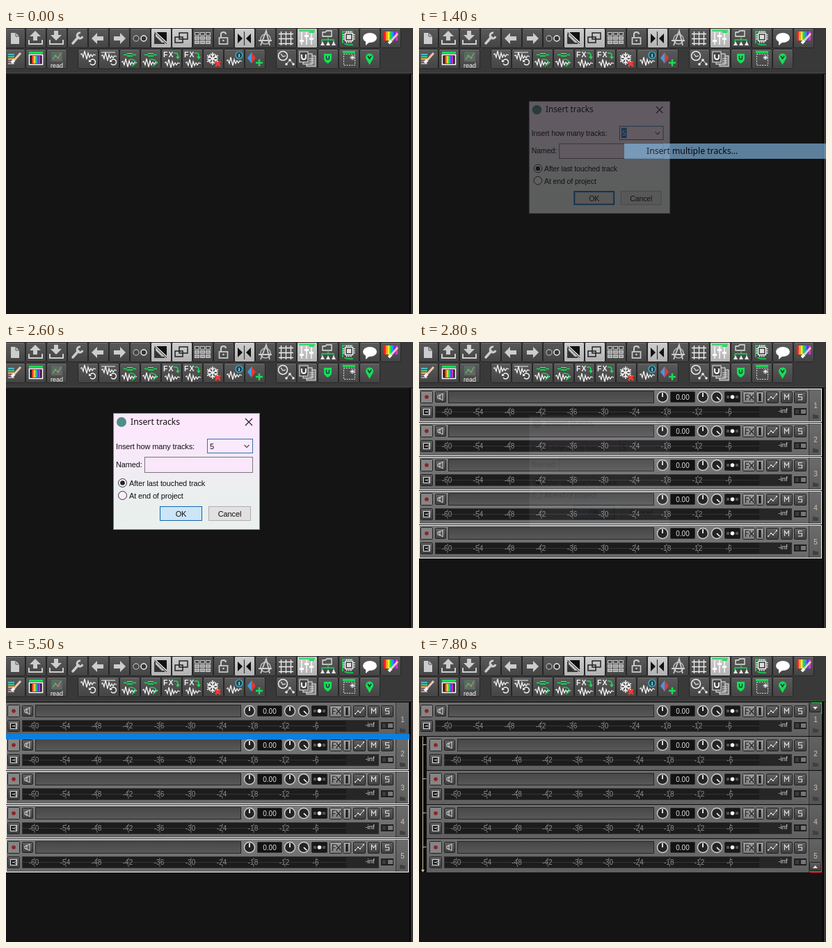
Write an HTML page that moves like this. It is 585x411 px and loops after 8 s.

```html
<!DOCTYPE html>
<html lang="en">
<head>
<meta charset="utf-8">
<title>Insert tracks</title>
<style>
html,body{margin:0;width:100%;height:100%;overflow:hidden;background:#141414}
svg{display:block;width:585px;height:411px}
text{font-family:"Liberation Sans",Arial,sans-serif;white-space:pre}
.ui{font-family:"Noto Sans","Open Sans",sans-serif;font-size:12.2px}
.dlg{font-size:11px;letter-spacing:-.14px}
</style>
</head>
<body>
<svg id="stage" viewBox="0 0 585 411" xmlns="http://www.w3.org/2000/svg"></svg>
<script>
(() => {
const R = (x, y, w, h, fill, more = '') => `<rect x="${x}" y="${y}" width="${w}" height="${h}" fill="${fill}" ${more}/>`;
const C = (x, y, r, fill, more = '') => `<circle cx="${x}" cy="${y}" r="${r}" fill="${fill}" ${more}/>`;
const L = (d, color, w = 1, more = '') => `<path d="${d}" fill="none" stroke="${color}" stroke-width="${w}" ${more}/>`;
const F = (d, fill) => `<path d="${d}" fill="${fill}"/>`;
const T = (x, y, size, fill, s, more = '') => `<text x="${x}" y="${y}" font-size="${size}" fill="${fill}" ${more}>${s}</text>`;
const G = (s, more = '') => `<g ${more}>${s}</g>`;
const mid = 'text-anchor="middle"';
const line = (c, w = 1) => `stroke="${c}" stroke-width="${w}"`;
const grad = (id, ...stops) => `<linearGradient id="${id}" x2="0" y2="1">${stops.map((c, i) =>
  `<stop offset="${i / (stops.length - 1)}" stop-color="${c}"/>`).join('')}</linearGradient>`;
const clamp = v => Math.max(0, Math.min(1, v));

const ink = '#cdcdcd', green = '#17dd55', white = '#f2f2f2';
const defs = '<defs>' + grad('btn', '#5a5a5a', '#444') + grad('lit', '#cfcfcf', '#b2b2b2') +
  grad('row', '#6f6f6f', '#606060') + grad('rowSel', '#7a7a7a', '#686868') + grad('name', '#474747', '#585858') +
  grad('key', '#626262', '#3e3e3e') + grad('fx', '#a0a0a0', '#7b7b7b') +
  grad('pane', '#ffe8ff', '#f8e8fa', '#ebefef', '#eaf0ee') + '</defs>';

// toolbar
const rainbow = (x, y, w, h) => ['#e22', '#f92', '#fe3', '#2d4', '#29f', '#63e', '#d3c']
  .map((c, i) => R(x + i * w / 7, y, w / 7 + .2, h, c)).join('');
const brush = (x, y) => L(`M${x} ${y}l-9 10`, '#e9c9b0', 3) + L(`M${x - 9} ${y + 10}l-4 4`, '#f4f4f4', 4);
const wave = (x, y) => L(`M${x} ${y}l2-1 2 5 2-9 3 12 2-9 2 6 2-4 2 3 2-3 3 1`, white, 1.3);
const loop = (x, y) => R(x - 5, y - 5, 10, 10, '#444') + L(`M${x - 3} ${y - 2}a4 4 0 1 1 0 4`, white, 1.5) + F(`M${x - 5} ${y - 4}v4h4z`, white);
const turn = (x, y) => L(`M${x} ${y}h3q3 0 3 4v3`, green, 1.6) + F(`M${x + 3} ${y + 5}h6l-3 4z`, green);
const rack = x => R(x + 11, 36, 8, 5, green) + L(`M${x + 6} 38.5h5M${x + 19} 38.5h5`, green, 1.3) +
  L(`M${x + 11} 38.5h8`, '#222') + wave(x + 3, 49) + L(`M${x + 15} 45q9 0 8 6l-5 4`, green, 1.4);
const fxWave = x => T(x + 3, 42, 10.5, white, 'FX', 'font-weight="bold" letter-spacing="1"') + turn(x + 18, 36) + wave(x + 5, 50);
const sliders = [[425, 17], [432, 10], [439, 14]].map(([x, y]) =>
  L(`M${x} 6V24`, '#fff', 1.4) + R(x - 3, y, 6, 3, '#fff')).join('');

const upper = [
  F('M7 7h7l5 5v11H7z', ink) + L('M14 7v5h5', '#555'),
  F('M42 4l8 8h-5v6h-6v-6h-5z', ink) + L('M33 17v6h19v-6', ink, 2),
  F('M72 18l8-8h-5V4h-6v6h-5z', ink) + L('M63 17v6h19v-6', ink, 2),
  L('M96 22l8-9', ink, 3.5, 'stroke-linecap="round"') + L('M107 7a4 4 0 1 0 3 5', ink, 3),
  F('M123 15l8-8v5h9v6h-9v5z', ink),
  F('M172 15l-8-8v5h-9v6h9v5z', ink),
  C(187, 15, 4, '#444', line('#aaa', 1.3)) + C(198, 15, 4, '#333', line('#eee', 1.5)),
  F('M213 6h18v17z', '#111') + L('M214 8v14h14', '#111', 1.5) + L('M215 6l16 15', '#eee', 1.5) + F('M215 12l9 9h-9z', '#333'),
  R(243, 13, 11, 8, 'none', line('#222', 1.5)) + R(249, 7, 12, 9, 'none', line('#222', 1.5)),
  [0, 1, 2].map(r => [0, 1, 2].map(c => R(271.5 + c * 8, 6.5 + r * 6, 6, 4, r ? '#999' : '#444', line('#ccc'))).join('')).join(''),
  R(306.5, 14, 12, 9, 'none', line(ink, 1.7)) + L('M309 14V9q0-3 3.5-3t3.5 3', ink, 2) + C(312.5, 18, 1.3, ink),
  F('M333 8l7 7-7 7zM352 8l-7 7 7 7z', '#111') + L('M342.5 5v20', '#333', 1.2),
  C(373, 16, 7, 'none', line('#bbb', 1.6)) + L('M366 25l8-21 5 21M363 18h19', '#ccc', 1.8),
  L('M395.5 5v20M402.5 5v20M409.5 5v20M392 8.5h21M392 15.5h21M392 22.5h21', '#eee', 1.3),
  R(421, 2, 23, 3, green, 'opacity=".7"') + sliders + L('M436 6h7', green, 2),
  L('M455 12V6h4l2-2h7v8z', '#e8e8e8', 1.3) + L('M463 12v5M454 21v-4h17v4', green, 1.3) +
    [452, 460, 468].map(x => F(`M${x} 25l3-6 3 6z`, '#e8e8e8')).join(''),
  L('M484 22V5h15', green, 1.6) + L('M487 22q1 3 12 2', green, 1.6) + R(487.5, 7.5, 11, 11, '#555', line('#fff', 1.3)) +
    R(490, 10, 6, 6, '#ddd') + L('M489 5.5h9M489 20.5h9M485.5 9v9M500.5 9v9', '#fff', 2, 'stroke-dasharray="1.5 1.5"'),
  '<ellipse cx="523" cy="14" rx="10" ry="7" fill="#fff"/>' + F('M517 18v7l6-5z', '#fff'),
  rainbow(543, 5, 20, 13) + brush(563, 8)
];
const lower = [
  [-2, ['#4bc', '#5c8', '#fb5', '#e66', '#aaa'].map((c, i) => R(3, 37 + i * 3.3, 9, 2, c)).join('') + brush(21, 36)],
  [28, R(33, 34, 20, 3, green) + R(33.5, 38.5, 19, 14, '#222', line('#fff', 1.5)) + rainbow(37, 40, 12, 11)],
  [58, R(65, 34, 16, 14, '#5d6a62') + L('M67 45l4-5 4 3 4-7', '#8db79c') + C(71, 40, 1.5, green) + C(75, 43, 1.5, '#e66') + T(73, 57, 9, '#fff', 'read', mid)],
  [103, wave(107, 38) + loop(124, 49)],
  [133, L('M137 35h20', white) + wave(137, 40) + loop(154, 49)],
  [163, rack(163)], [193, rack(193)], [223, fxWave(223)], [253, fxWave(253)],
  [283, [30, 90, 150].map(a => G(L('M288 44h18M290 41l3 3-3 3M304 41l-3 3 3 3', white, 1.5), `transform="rotate(${a} 297 44)"`)).join('') +
    L('M301 48l7 7M308 48l-7 7', '#f23b35', 3)],
  [313, wave(317, 47) + C(335, 39, 5, '#164b5c', line('#49b6cf', 1.2)) + T(335, 42, 8, '#fff', 'i', mid + ' font-weight="bold"')],
  [343, F('M353 35v16l-6-8z', '#3e9be0') + F('M353 35v16l6-8z', '#e03a36') + L('M359 50h10M364 45v10', green, 2.5)],
  [388, C(398, 40, 6.5, 'none', line('#eee', 1.5)) + L('M395 37l3 4 4-1', '#eee', 1.2) + L('M403 52l5-6 5 6', '#eee') +
    [[403, 52], [408, 46], [413, 52]].map(p => C(...p, 1.8, '#eee')).join('')],
  [418, R(432, 40, 13, 15, '#777', line('#eee')) + R(427, 37, 13, 15, '#666', line('#eee')) + R(422, 34, 12, 15, '#444', line('#eee')) +
    L('M425 38v4q0 3 3 3t3-3v-4', '#fff', 1.8) + L('M436 44h7M436 47h7M436 50h7', '#ddd')],
  [448, F('M457 37h11v7q0 4-5.5 7-5.5-3-5.5-7z', green) + L('M460.5 40v3q0 2 2 2t2-2v-3', '#134', 1.3)],
  [478, R(484, 33, 18, 3, green) + R(485.5, 37.5, 16, 16, 'none', 'stroke="#ddd" stroke-dasharray="2 1.5"') +
    L('M498 39v7M494.5 42.5h7M495.5 40l5 5M500.5 40l-5 5', '#fff')],
  [508, C(522.5, 42, 5.5, green) + F('M518 45h9l-4.5 8z', green) + L('M520 40l2.5 4 2.5-4', '#134', 1.5)]
];
const button = (x, y, fill) => R(x + .5, y + .5, 29, 28, fill, 'rx="2" stroke="#262626"') + L(`M${x + 2} ${y + 1.5}h26`, '#fff', 1, 'opacity=".16"');
const lit = [7, 8, 11, 14];
const toolbar = R(0, 0, 585, 65, '#393939') + R(0, 64, 585, 1, '#4a4a4a') + R(0, 65, 581, 2, '#202020') +
  upper.map((s, i) => button(-2 + 30 * i, 0, lit.includes(i) ? 'url(#lit)' : 'url(#btn)') + s).join('') +
  lower.map(([x, s]) => button(x, 30, 'url(#btn)') + s).join('') +
  R(580, 66, 2, 345, '#060606') + R(582, 66, 3, 345, '#373737');

// one track panel, drawn for the first row and shifted down
const key = (x, y, w, h, fill = 'url(#key)') => R(x + .5, y + .5, w - 1, h - 1, fill, 'rx="1" stroke="#202020"');
const knob = (x, a) => C(x, 79, 7.5, '#242424', line('#d0d0d0', 1.4)) +
  L(`M${x} 79v-6`, '#fff', 1.7, `transform="rotate(${a} ${x} 79)"`);
function panel(i, inset) {
  const x = inset ? 13 : 0, edge = inset ? 11 : 0, m = 23 + x;
  const step = inset ? 43.75 : 45;
  let s = R(edge, 67, 579 - edge, 48, 'url(#row)', 'class="body"') + R(560, 67, 1, 48, '#383838') + R(561, 67, 18, 48, '#000', 'opacity=".12"');
  s += key(x + 2, 70, 18, 18, '#858585') + C(x + 11, 79, 2.8, '#8a2328') + key(x + 23, 71, 16, 16) +
    L(`M${x + 27} 77h3l4-3v10l-4-3h-3z`, '#ddd') + L(`M${x + 30} 75v8`, '#ddd');
  s += R(x + 42.5, 70.5, 295 - x, 17, 'url(#name)', line('#252525'));
  s += knob(350, 0) + R(361.5, 71.5, 35, 15, '#121212', 'rx="1" stroke="#333"') + T(379, 82.5, 10, '#dedede', '0.00', mid) + knob(408, 0) + knob(428, 135);
  s += R(439.5, 71.5, 22, 15, '#181818', 'rx="1" stroke="#2a2a2a"') + R(442, 77, 4, 4, '#555') + R(455, 77, 4, 4, '#555') + C(450.5, 79, 2.8, '#fff');
  s += key(465, 71, 18, 17, 'url(#fx)') + L('M469.5 84v-9h4.5M469.5 79.5h4M475.5 75v2l5 5v2M480.5 75v2l-5 5v2', '#252525', 1.2);
  s += key(484, 71, 12, 17, 'url(#fx)') + R(488.5, 74, 3, 11, '#151515');
  s += key(499, 71, 18, 17) + L('M502 83l4-4 3 2 5-6', '#ddd') + [[502, 83], [506, 79], [509, 81], [514, 75]].map(p => C(...p, 1.1, '#eee')).join('');
  s += key(520, 71, 17, 17) + L('M525.5 83v-7.5l3 4 3-4v7.5', '#e4e4e4', 1.1);
  s += key(539, 71, 18, 17) + L('M551 75.5h-5.5v3.5h5v4h-5.5', '#e4e4e4', 1.1);
  s += key(x + 2, 92, 18, 17) + R(x + 6.5, 96.5, 9, 8, '#222', line('#ddd')) + L(`M${x + 9} 100.5h3l3-3v6l-3-3`, '#ddd');
  s += R(m + .5, 92.5, 512 - x, 16, '#1c1c1c', line('#303030')) + R(m + 1, 100, 511 - x, 1, '#343434') + R(489, 93, 46, 15, '#262626');
  for (let k = 0; k < 10; k++) {
    const tx = m + 18 + k * step;
    s += L(`M${tx} 94v3M${tx} 104v3`, '#777') + T(tx - 1, 103.5, 10, '#8d8d8d', k * 6 - 60, mid);
  }
  s += T(523, 102, 9.5, '#ddd', '-inf', mid) + R(539.5, 95.5, 17, 9, '#222', line('#1b1b1b')) + R(549, 97, 7, 6, '#777') + R(541, 97, 5, 6, '#3b3b3b');
  s += T(570, 94.5, 10, '#cfc69e', i + 1, mid) + F('M566 104h3l1 1h4v5h-8z', '#404040');
  s += R(edge + .5, 67.5, 578 - edge, 47, 'none', 'class="sel" stroke="#fff"');
  return G(s, `class="track" transform="translate(0 ${49 * i})"`);
}
const rows = [0, 1, 2, 3, 4];
const list = inset => R(0, 67, 580, 244, '#0c0c0c') + rows.map(i => panel(i, inset && i > 0)).join('');
const fold = (y, d) => key(561, y, 17, 13) + F(d, '#e8e8e8');
const tree = L('M5.5 116V310M5.5 127.5h5M5.5 176.5h5M5.5 225.5h5M5.5 274.5h5', '#c8c09c') + F('M3 307h5l-2.5 4z', '#c8c09c') +
  fold(68, 'M566 73h7l-3.5 4z') + L('M564 67.5h14.5V83', '#22d84a', 1.3) +
  fold(296, 'M566 305h7l-3.5-4z') + L('M562 310.5h16.5V296', '#f0352d', 1.3);

// popup menu and dialog
const entries = ['Insert new track', 'Insert multiple tracks...', 'Insert virtual instrument on new track...', 'Insert track from template', 'Show master track'];
const label = (i, color) => T(327, 181 + 22 * (i - 1), 12.2, color, entries[i], 'class="ui"');
const menu = R(292.5, 141.5, 300, 116, '#f0f0f0', line('#a9a9a9')) +
  R(295, 144, 290, 22, '#91c9f7', 'id="hover"') + entries.map((e, i) => label(i, '#111')).join('');
const chosen = R(295, 166, 290, 22, '#86bdea') + label(1, '#000');
const D = (x, y, s, more = '') => T(x, y, 11, '#111', s, 'class="dlg" ' + more);
const radio = (y, on) => C(167.5, y, 6, '#fbeefc', 'stroke="#333"') + (on ? C(167.5, y, 3.3, '#222') : '');
const dialog = R(154.5, 102.5, 210, 167, 'url(#pane)', line('#6c8291')) + R(155, 103, 209, 24, '#fde7fd') +
  C(166, 115, 7, '#4b8f86') + T(179, 119, 12.2, '#111', 'Insert tracks', 'class="ui"') + L('M344 110l10 10M354 110l-10 10', '#222', 1.2) +
  D(158, 154, 'Insert how many tracks:') + R(289.5, 139.5, 65, 20, '#fbeafc', line('#2e74b5')) +
  R(292, 142, 8, 15, '#1c74cc', 'id="mark"') + T(293, 153.5, 11, '#111', '5', 'id="count"') + L('M342.5 148l3.5 3.5 3.5-3.5', '#444', 1.1) +
  D(158, 180, 'Named:') + R(199.5, 165.5, 155, 22, '#fbe7fc', line('#777')) +
  radio(202.5, true) + D(177, 207, 'After last touched track') + radio(220.5) + D(177, 225, 'At end of project') +
  R(222, 237, 59, 19, '#e1e1e1', line('#0a6cbd', 2)) +
  R(221.5, 236.5, 60, 20, '#cce5f8', 'id="warm" stroke="#1264a8"') + D(251.5, 251, 'OK', mid) +
  R(291.5, 236.5, 60, 20, '#e2e0e2', line('#adadad')) + D(321.5, 251, 'Cancel', mid);

const $ = id => document.getElementById(id);
$('stage').innerHTML = defs + R(0, 0, 585, 411, '#141414') + toolbar +
  G(list(false), 'id="flat"') + G(list(true) + tree, 'id="nested"') +
  R(0, 112, 580, 8, '#0b80df', 'id="drop"') +
  G(menu, 'id="menu"') + G(dialog, 'id="dialog"') + G(chosen, 'id="chosen"');

const show = (id, a) => $(id).setAttribute('opacity', a);
const [flatRows, nestedRows] = ['flat', 'nested'].map(id => [...$(id).querySelectorAll('.track')]);
const inside = (t, a, b) => t >= a && t < b;

function selected(t, i) {
  if (inside(t, 2700, 3200)) return true;
  if (inside(t, 3800, 4300)) return i === 0;
  if (inside(t, 4300, 4900)) return i === 1;
  return inside(t, 4900, 7800) && i > 0;
}

function draw(ms) {
  const t = Math.floor(ms % 8000 / 100) * 100;
  show('menu', inside(t, 500, 1300) ? clamp((t - 400) / 300) : 0);
  $('hover').setAttribute('y', t < 1100 ? 144 : 166);
  show('chosen', inside(t, 1300, 1600) ? .95 * (1600 - t) / 300 : 0);

  const grow = t < 2600 ? clamp((t - 1300) / 300) : clamp((2900 - t) / 300);
  const size = .945 + .055 * grow;
  show('dialog', t < 2600 ? grow : Math.pow(grow, 2.5));
  $('dialog').setAttribute('transform', `translate(259.5 186) scale(${size}) translate(-259.5 -186)`);
  show('mark', clamp((1900 - t) / 200));
  $('count').setAttribute('fill', t < 1800 ? '#fff' : '#111');
  show('warm', clamp((t - 2000) / 400));

  const nested = t >= 7100;
  show('flat', t >= 2700 && !nested ? 1 : 0);
  show('nested', nested ? 1 : 0);
  (nested ? nestedRows : flatRows).forEach((g, i) => {
    const on = selected(t, i);
    g.querySelector('.sel').setAttribute('opacity', on ? 1 : 0);
    g.querySelector('.body').setAttribute('fill', on ? 'url(#rowSel)' : 'url(#row)');
  });

  const left = t >= 6200 ? 11 : 0;
  show('drop', inside(t, 5500, 7100) ? 1 : 0);
  $('drop').setAttribute('x', left);
  $('drop').setAttribute('width', 580 - left);
  $('drop').setAttribute('y', inside(t, 5800, 6200) ? 65 : 112);
}

const start = performance.now();
function tick() {
  draw(performance.now() - start);
  requestAnimationFrame(tick);
}
tick();
})();
</script>
</body>
</html>
```
